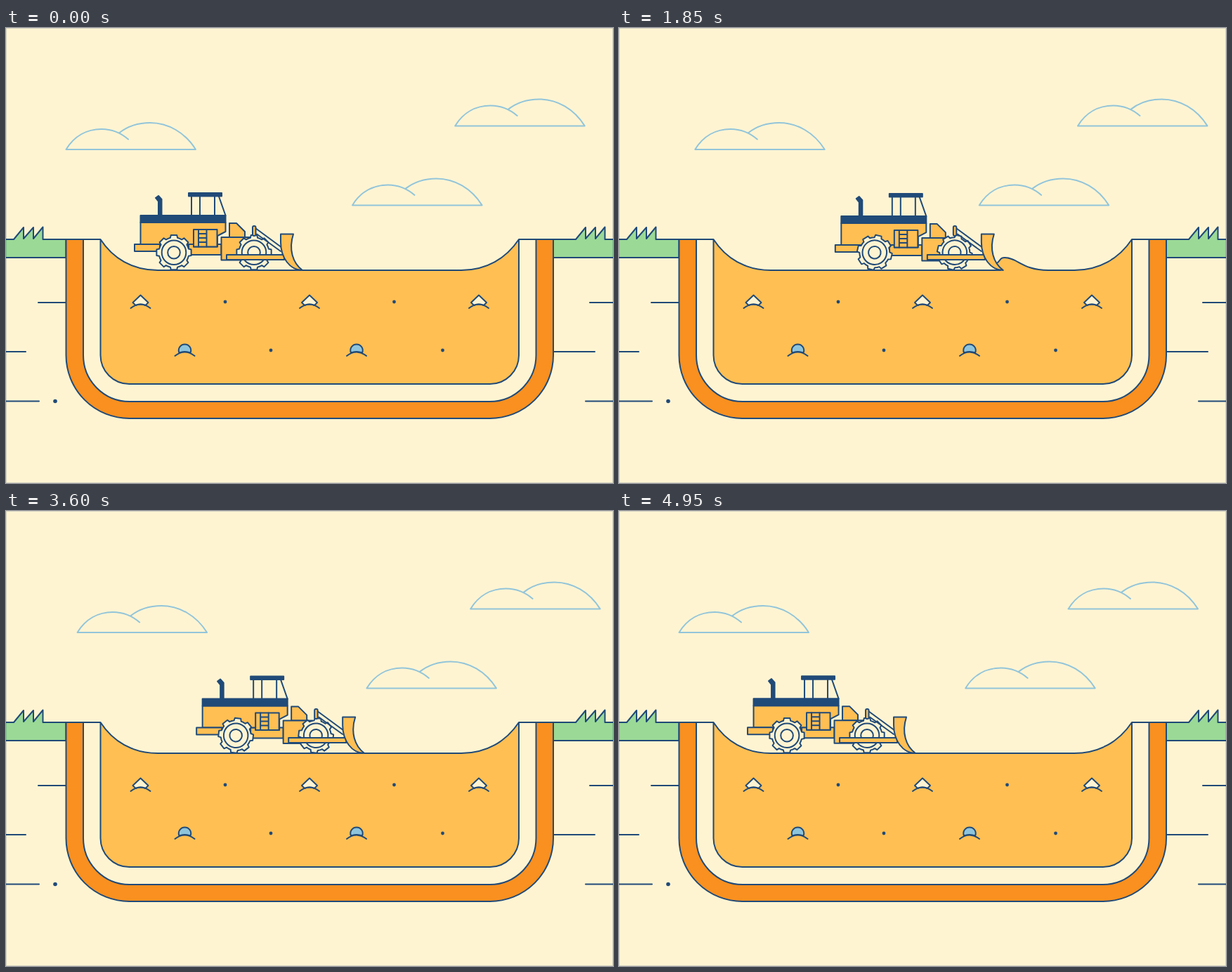
These frames come from a looping animation (864x648 px, 5000 ms). An HTML page:

```html
<!DOCTYPE html>
<html lang="en">
<head>
<meta charset="utf-8">
<title>Bulldozer</title>
<style>
  html, body { margin: 0; width: 100%; height: 100%; overflow: hidden; background: #fff4d2; }
  svg { display: block; width: 864px; height: 648px; }
  .ink { fill: none; stroke: #204a78; stroke-width: 2; stroke-linejoin: round; stroke-linecap: round; }
  .cream { fill: #fff4d2; }
  .yellow { fill: #ffbf53; }
  .orange { fill: #f9901f; }
  .green { fill: #9ad996; }
  .blue { fill: #8fc5dc; }
  .navy { fill: #204a78; }
  .cloud { fill: none; stroke: #92c5da; stroke-width: 2; stroke-linejoin: round; stroke-linecap: round; }
</style>
</head>
<body>
<svg viewBox="0 0 864 648">
  <defs>
    <path id="cloud" d="M174 158.500C163 149 150 144 136 144C115 144 97 154 85.500 173H270C255 149 231 135 205 135C189 135 173 140 161 149.500"/>
    <path id="grass" d="M-5 301H11L25 284V300L39 284V300L52.500 283.500V301H85.500V327H-5Z"/>
    <g id="stone">
      <path class="cream" d="M-11 391L0 380.500L11 391L7 395Q0 392 -7 395Z"/>
      <path d="M-14 399Q0 388 14 399"/>
    </g>
    <g id="pebble">
      <path class="blue" d="M-8 462.500A8.700 8.700 0 1 1 8 462.500Q0 459.500 -8 462.500Z"/>
      <path d="M-14 467Q0 456 14 467"/>
    </g>
    <g id="wheel">
      <path id="gear" class="cream"/>
      <circle r="17.300"/>
      <circle r="8.800"/>
    </g>
  </defs>

  <rect class="cream" width="864" height="648"/>

  <g class="cloud" id="clouds">
    <use href="#cloud"/><use href="#cloud"/><use href="#cloud"/>
  </g>

  <g class="ink">
    <use href="#grass" class="green"/>
    <path class="green" d="M779 301H811L825 284V300L839 284V300L852.500 283.500V301H870V327H779Z"/>
    <path class="orange" d="M85.500 301V466A90 90 0 0 0 175.500 556H689A90 90 0 0 0 779 466V301Z"/>
    <path class="cream" d="M110 301V466A66 66 0 0 0 176 532H688.500A66 66 0 0 0 754.500 466V301Z"/>
    <path class="cream" stroke="none" d="M134.500 299H730V345H134.500Z"/>
    <path class="yellow" d="M134.500 301C152 328 180 345 216 345H648C684 345 712 328 730 301V466A41 41 0 0 1 689 507H175.500A41 41 0 0 1 134.500 466Z"/>
    <path d="M46 391H85M0 461H28M0 531.500H47M831 391H864M779 461H838M825 531.500H864"/>
    <use href="#stone" x="191.500"/><use href="#stone" x="432"/><use href="#stone" x="673"/>
    <use href="#pebble" x="254.500"/><use href="#pebble" x="499"/>
  </g>
  <g class="navy">
    <circle cx="70" cy="531.500" r="2.800"/>
    <circle cx="312" cy="390" r="2.400"/><circle cx="552.500" cy="390" r="2.400"/>
    <circle cx="377" cy="459" r="2.400"/><circle cx="621.500" cy="459" r="2.400"/>
  </g>

  <path id="pileFill" class="yellow"/>
  <path id="pileEdge" class="ink"/>

  <g id="dozer" class="ink">
    <g id="body">
      <path class="navy" d="M213 242L217 239L221.500 244V267H217V247Z"/>
      <path d="M264 240V267M276 240V267M297 240V267M303 240L312.500 267"/>
      <rect class="navy" x="260" y="235" width="47" height="4.500"/>
      <rect class="yellow" x="260" y="308" width="46.500" height="15"/>
      <path class="yellow" d="M191.500 277H312.500V290L301 296V311.500H267V308H191.500Z"/>
      <rect class="navy" x="191.500" y="267" width="121" height="10"/>
      <rect class="yellow" x="183" y="308" width="36" height="10"/>
      <rect class="yellow" x="267" y="287" width="33.500" height="24.500"/>
      <path d="M274 287V311.500M285.500 287V311.500M274 293H285.500M274 299H285.500M274 305H285.500"/>
      <path class="yellow" d="M318 298V278H328L340 290V298Z"/>
      <path class="yellow" d="M306.500 298H348V330.500H306.500Z"/>
    </g>
    <use href="#wheel" class="wheel" data-x="239"/>
    <use href="#wheel" class="wheel" data-x="353"/>
    <path d="M355 285L391 311.500M357 293.500L391 318"/>
    <rect class="yellow" x="351" y="282" width="4.500" height="14" rx="2"/>
    <rect class="yellow" x="314" y="323" width="82" height="7"/>
    <path class="yellow" d="M391 293.500H409C402 315 408 335 422 345C404 345 391 327 391 305Z"/>
  </g>

  <rect x=".5" y=".5" width="863" height="647" fill="none" stroke="#204a78" stroke-opacity=".18"/>
</svg>
<script>
const LOOP = 5000, HALF = LOOP / 2;
const $ = id => document.getElementById(id);
const clouds = [...$('clouds').children];
const wheels = [...document.querySelectorAll('.wheel')];
const cloudStarts = [[0, 0, 0], [407.3, 79.4, 250], [552.5, -33.6, 500]]; // x, y, delay

// Same curve as cubic-bezier(.6, 0, .4, 1)
function ease(p) {
  p = Math.min(1, Math.max(0, p));
  let s = p;
  for (let i = 0; i < 8; i++)
    s -= (1.8 * s - 2.4 * s * s + 1.6 * s ** 3 - p) / (1.8 - 4.8 * s + 4.8 * s * s);
  return s * s * (3 - 2 * s);
}

function thereAndBack(t) {
  t = (t + LOOP) % LOOP;
  return t < HALF ? ease(t / HALF) : 1 - ease((t - HALF) / HALF);
}

function gearPath(teeth, root, tip) {
  const points = [];
  const add = (r, a) => points.push((r * Math.sin(a)).toFixed(2) + ' ' + (-r * Math.cos(a)).toFixed(2));
  for (let i = 0; i < teeth; i++) {
    const a = i * 2 * Math.PI / teeth;
    add(root, a - .24); add(tip, a - .17); add(tip, a + .17); add(root, a + .24);
    add(root, a + Math.PI / teeth);
  }
  return 'M' + points.join('L') + 'Z';
}

function drawPile(t, k) {
  const h = 21.5 * ease((t - 600) / 900) * (1 - ease((t - 1500) / 1050));
  const tip = 421.5 + 137 * k, end = 508 + 113 * k, peak = tip + 22 - 21 * k;
  const left = tip - 9 * h / 21.5, y = 345 - h;
  const edge = `M${left} ${345 - .6 * h}C${(left + peak) / 2} ${y + .1 * h} ${peak - 6} ${y} ${peak} ${y}` +
    `C${peak + .3 * (end - peak)} ${y} ${peak + .4 * (end - peak)} 345 ${end} 345`;
  $('pileEdge').setAttribute('d', edge);
  $('pileFill').setAttribute('d', edge + `V347H${tip - 2}Z`);
}

function draw(now) {
  const t = now % LOOP, k = thereAndBack(t);
  const bob = .85 * (1 - Math.cos(t / 500 * 2 * Math.PI));
  $('dozer').setAttribute('transform', `translate(${137 * k} 0)`);
  $('body').setAttribute('transform', `translate(0 ${bob})`);
  wheels.forEach(w => w.setAttribute('transform', `translate(${w.dataset.x} 319.7) rotate(${360 * k})`));
  clouds.forEach((c, i) => {
    const [x, y, delay] = cloudStarts[i];
    c.setAttribute('transform', `translate(${x + 25 * thereAndBack(t - delay)} ${y})`);
  });
  drawPile(t, k);
}

$('gear').setAttribute('d', gearPath(8, 21.5, 25));
const start = performance.now();
(function frame() {
  draw(performance.now() - start);
  requestAnimationFrame(frame);
})();
</script>
</body>
</html>
```
